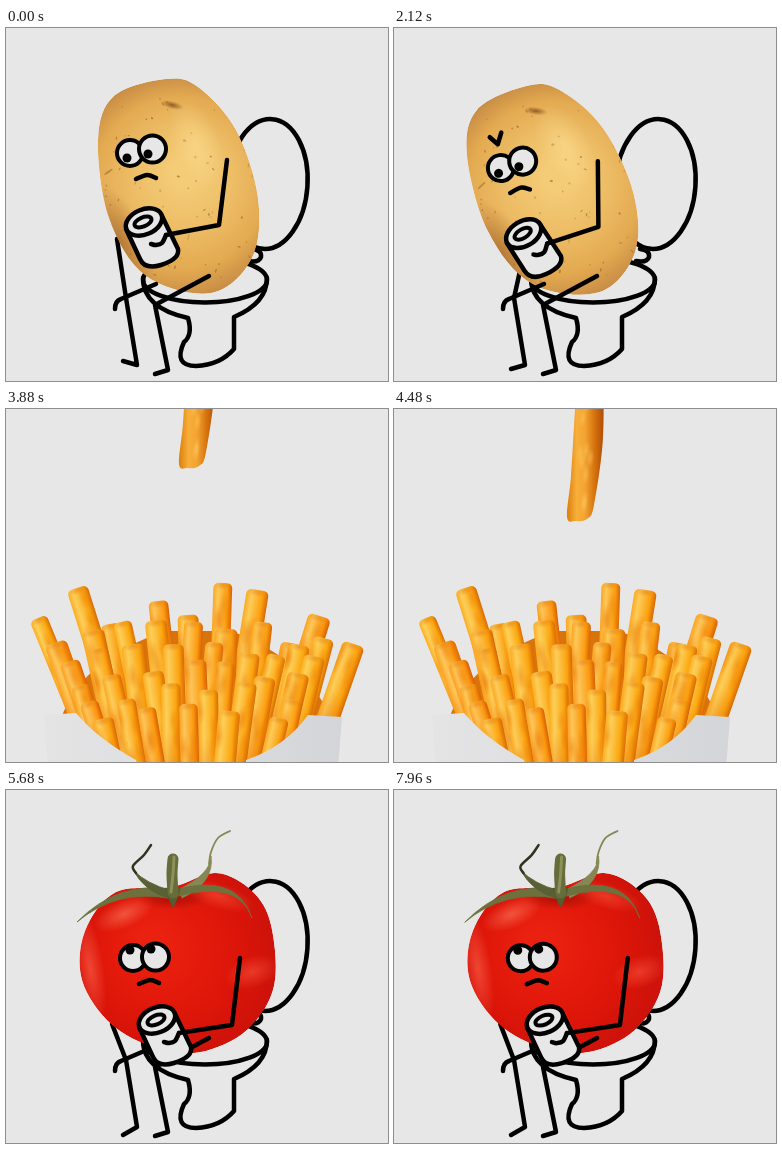
Write an HTML page with a canvas that moves like this. It is 382 px wide and 353 px high and loops after 8 s.

```html
<!DOCTYPE html>
<html lang="en">
<head>
<meta charset="utf-8">
<title>Waiting vegetables</title>
<style>
html, body { margin: 0; width: 100%; height: 100%; overflow: hidden; background: #e7e7e7; }
canvas { display: block; }
</style>
</head>
<body>
<canvas id="stage" width="382" height="353"></canvas>
<script>
const ctx = document.getElementById('stage').getContext('2d');
const TAU = Math.PI * 2, LOOP = 8000;
const FRIES_START = 2920, TOMATO_START = 5680;
const PAPER = '#e7e7e7';
const clamp = v => Math.max(0, Math.min(1, v));
const mix = (a, b, k) => a + (b - a) * k;
const smoother = u => u * u * u * (u * (u * 6 - 15) + 10);

function random(seed) {
  return () => (seed = (seed * 16807) % 2147483647) / 2147483647;
}

// Smooth path through flat x, y pairs.
function curve(p, closed) {
  const n = p.length / 2, path = new Path2D();
  const at = i => {
    const j = closed ? (i + n) % n : Math.max(0, Math.min(n - 1, i));
    return [p[j * 2], p[j * 2 + 1]];
  };
  path.moveTo(p[0], p[1]);
  for (let i = 0; i < (closed ? n : n - 1); i++) {
    const [a, b, c, d] = [at(i - 1), at(i), at(i + 1), at(i + 2)];
    path.bezierCurveTo(b[0] + (c[0] - a[0]) / 6, b[1] + (c[1] - a[1]) / 6,
      c[0] - (d[0] - b[0]) / 6, c[1] - (d[1] - b[1]) / 6, c[0], c[1]);
  }
  if (closed) path.closePath();
  return path;
}

function ink(path, width = 4.5, color = '#000') {
  ctx.lineWidth = width;
  ctx.strokeStyle = color;
  ctx.stroke(path);
}

function line(...p) {
  const path = new Path2D();
  for (let i = 0; i < p.length; i += 2) path.lineTo(p[i], p[i + 1]);
  ink(path);
}

function oval(x, y, rx, ry, angle = 0) {
  const path = new Path2D();
  path.ellipse(x, y, rx, ry, angle, 0, TAU);
  return path;
}

function paint(path, fill) {
  ctx.fillStyle = fill;
  ctx.fill(path);
}

function shade(g, ...colors) {
  colors.forEach((c, i) => g.addColorStop(i / (colors.length - 1), c));
  return g;
}

function glow(x, y, rx, ry, angle, rgb, alpha) {
  ctx.save();
  ctx.translate(x, y);
  ctx.rotate(angle);
  ctx.scale(rx, ry);
  paint(oval(0, 0, 1, 1),
    shade(ctx.createRadialGradient(0, 0, 0, 0, 0, 1), `rgba(${rgb},${alpha})`, `rgba(${rgb},0)`));
  ctx.restore();
}

const potatoShape = curve([160, 51, 108, 68, 92, 112, 103, 190, 140, 248, 205, 265,
  246, 230, 252, 170, 230, 102, 192, 59], true);
const tomatoShape = curve([166, 97, 110, 102, 79, 141, 76, 190, 105, 234, 150, 258,
  195, 262, 241, 240, 268, 196, 265, 135, 246, 101, 210, 83], true);

function potatoBody() {
  ctx.save();
  ctx.clip(potatoShape);
  paint(potatoShape, shade(ctx.createRadialGradient(180, 145, 15, 172, 160, 122),
    '#f4cb77', '#edbd66', '#e3aa51', '#bd8140'));
  glow(112, 215, 30, 62, -.4, '145,82,32', .6);
  glow(190, 115, 24, 46, -.4, '255,226,150', .5);
  glow(166, 77, 12, 4, .25, '120,65,20', .75);
  const rnd = random(29);
  for (let i = 0; i < 80; i++) {
    const size = i % 20 ? 1 : 2.5;
    paint(oval(95 + rnd() * 155, 55 + rnd() * 205, (.6 + rnd() * 1.5) * size, .5 + rnd() * .7, rnd() * 3),
      `rgba(140,82,32,${.2 + rnd() * .4})`);
  }
  ctx.restore();
}

// Tapering blade that bends towards (cx, cy).
function leaf(x, y, cx, cy, tipX, tipY, width, color) {
  const length = Math.hypot(cx - x, cy - y);
  const nx = (y - cy) / length * width / 2, ny = (cx - x) / length * width / 2;
  const path = new Path2D();
  path.moveTo(x + nx, y + ny);
  path.quadraticCurveTo(cx + nx, cy + ny, tipX, tipY);
  path.quadraticCurveTo(cx - nx, cy - ny, x - nx, y - ny);
  paint(path, color);
  ink(path, .8, color);
}

function tomatoBody() {
  ctx.save();
  ctx.clip(tomatoShape);
  paint(tomatoShape, shade(ctx.createRadialGradient(145, 155, 15, 165, 168, 115),
    '#ea2110', '#e31a0b', '#d91409', '#c8120b'));
  glow(84, 178, 14, 58, -.15, '255,110,85', .55);
  glow(118, 124, 32, 14, -.4, '255,140,110', .5);
  glow(212, 106, 38, 13, .3, '255,100,70', .45);
  glow(246, 182, 28, 16, -.3, '255,95,70', .5);
  glow(166, 108, 36, 12, 0, '110,8,0', .5);
  ctx.restore();
  leaf(165, 104, 112, 94, 71, 132, 9, '#6c713e');
  leaf(163, 104, 140, 98, 127, 80, 8, '#596035');
  ink(curve([130, 83, 127, 76, 138, 65, 145, 55]), 2.5, '#30331f');
  leaf(174, 104, 207, 88, 205, 66, 9, '#858854');
  ink(curve([203, 74, 205, 62, 212, 48, 224, 41]), 1.8, '#858854');
  leaf(170, 103, 232, 86, 246, 128, 7, '#6c713e');
  leaf(167, 98, 167, 104, 167, 117, 14, '#555c31');
  ink(curve([167, 69, 166, 84, 167, 103]), 11, '#666c3a');
  ink(curve([168, 67, 167, 84, 165, 102]), 3, '#8c9159');
}

function eye(x, y, r, px, py) {
  paint(oval(x, y, r, r), PAPER);
  ink(oval(x, y, r, r), 4);
  paint(oval(px, py, 4.5, 4.5), '#000');
}

// Eyes, mouth and a frown that appears while straining.
function face(x, y, rise, look, strained) {
  eye(x, y, 13, x - 3, y + look);
  eye(x + 22.5, y - rise, 13.5, x + 18, y - rise + look);
  const mx = x + 14, my = y + 22;
  ink(curve([mx - 8, my + 4, mx + 3, my, mx + 12, my + 3]));
  if (strained) line(x - 7, y - 32, x, y - 24, x + 5, y - 35);
}

function paperRoll() {
  const side = new Path2D('M120 201L134 231Q139 242 155 237Q174 231 172 221L156 188Z');
  const top = oval(138, 194, 19, 12.5, -.4);
  for (const part of [side, top]) {
    paint(part, PAPER);
    ink(part);
  }
  ink(oval(137, 194, 9, 4.5, -.4), 4);
  ink(curve([160, 207, 156, 215, 150, 217, 145, 216]));
}

const potato = {
  body: potatoBody, face: [124, 125, 4, 5], roll: [0, 0], toe: 341, shoulder: [111, 211],
  arm: [221, 132, 213, 197, 160, 207]
};
const tomato = {
  body: tomatoBody, face: [127, 168, 1, -8], roll: [13, 36], toe: 345, shoulder: [106, 234],
  arm: [234, 168, 226, 235, 173, 243]
};

function toilet() {
  ink(oval(261.5, 156, 40, 65, .07));
  ink(new Path2D('M246 221Q256 222 255 229Q253 235 242 233'));
  ink(oval(199, 252, 62, 22.5));
  ink(new Path2D('M137 250Q137 280 182 290Q187 307 178 314Q167 338 190 338' +
    'Q214 337 228 321V289Q261 275 261 250'));
}

function leaning(tilt, shift, drawing) {
  ctx.save();
  ctx.translate(200, 265);
  ctx.rotate(-.133 * tilt);
  ctx.translate(-200, -265 + shift * tilt);
  drawing();
  ctx.restore();
}

// Foot taps, a pause, then the whole body strains to the left.
function sitter(who, time) {
  const step = Math.floor(time / 80);
  const lift = time < 1680 ? (step % 3) / 2 : 0;
  const tilt = smoother(clamp((step * 80 - 2200) / 320));
  toilet();
  line(mix(who.shoulder[0], 127, tilt), mix(who.shoulder[1], 240, tilt), 120, 270);
  leaning(tilt, 0, who.body);
  leaning(tilt, 4, () => face(...who.face, tilt > .4));

  line(203, 248, 149, 277, 162, 342, 149, 346);
  ink(new Path2D('M150 256L115 271Q109 273 109 281'));
  line(120, 270, 131, 337, 117, mix(who.toe, 333, lift));

  leaning(tilt, 3, () => {
    ctx.save();
    ctx.translate(...who.roll);
    paperRoll();
    ctx.restore();
    line(...who.arm);
  });
}

// Every fry leans towards the middle of the carton.
function fry(x, y, rnd) {
  const width = 18 + rnd() * 5, half = width / 2, hue = 34 + rnd() * 5;
  const tone = (lightness, turn = 0) => `hsl(${hue + turn},97%,${lightness}%)`;
  ctx.save();
  ctx.translate(x, y);
  ctx.rotate((x - 190) * .0023 + (rnd() - .5) * .12);
  const shape = new Path2D();
  shape.roundRect(-half, 0, width, 118, 5);
  paint(shape, shade(ctx.createLinearGradient(-half, 0, half, 0),
    tone(56), tone(67, 5), tone(60, 2), tone(52), tone(43, -9)));
  ctx.clip(shape);
  for (let i = 0; i < 4; i++) {
    glow((rnd() - .5) * width, 8 + rnd() * 60, 6, 14, 0, '235,125,10', .45);
  }
  glow(0, 2, half, 5, 0, '225,125,20', .5);
  glow(0, 118, width, 70, 0, '215,85,0', .55);
  ctx.restore();
}

const peaks = [[32, 209], [71, 179], [104, 215], [152, 192], [182, 206],
  [217, 174], [252, 181], [285, 234], [314, 207], [348, 235]];

const dropShape = curve([-11, -4, -7, -45, -3, -112, -1, -146, 22, -146,
  25, -84, 16, -16, 9, -2, -2, 0], true);

// Slides in slowly, hangs for a moment, falls and settles.
function droppedFry(time) {
  if (time < 3560) return;
  const eased = 112 * (1 - Math.pow(1 - clamp((time - 3520) / 960), 1.59));
  const fall = clamp((time - 4480) / 320);
  const settle = clamp((time - 4800) / 280);
  const wobble = Math.sin(settle * TAU * 1.5) * (1 - settle);
  ctx.save();
  ctx.translate(184, eased + 178 * fall * fall - 8 * Math.abs(wobble));
  ctx.rotate(.06 * wobble);
  paint(dropShape, shade(ctx.createLinearGradient(-10, 0, 24, 0),
    '#de8412', '#f8ae3a', '#f3a332', '#d9780f', '#b85207'));
  const rnd = random(11);
  for (let i = 0; i < 9; i++) {
    glow(2 + rnd() * 12, -10 - rnd() * 130, 4, 10, .1, '255,205,100', .45);
  }
  ctx.restore();
}

const heap = new Path2D('M55 310Q75 250 160 222H225Q300 250 325 310L240 375H130Z');
const carton = new Path2D('M38 306L70 304Q92 330 130 351L132 360H240V351Q279 338 302 306L336 308L332 360H42Z');

function friesScene(time) {
  const rnd = random(7);
  paint(heap, '#d9730c');
  for (const [x, y] of peaks) fry(x, y, rnd);
  for (let row = 0; row < 5; row++) {
    if (row === 2) droppedFry(Math.floor(time / 40) * 40);
    const count = 9 - row, reach = 138 - row * 13;
    for (let i = 0; i < count; i++) {
      const x = 185 + reach * (2 * i / (count - 1) - 1) + (rnd() - .5) * 12;
      fry(x, 214 + row * 21 + (x - 185) ** 2 * .0013 + (rnd() - .5) * 16, rnd);
    }
  }
  paint(carton, shade(ctx.createLinearGradient(38, 0, 336, 0), '#e4e4e5', '#dcdddf', '#d4d5d8'));
}

function draw(time) {
  ctx.fillStyle = '#e7e7e7';
  ctx.fillRect(0, 0, 382, 353);
  ctx.lineCap = ctx.lineJoin = 'round';
  if (time < FRIES_START) sitter(potato, time + 400);
  else if (time < TOMATO_START) friesScene(time);
  else sitter(tomato, time - TOMATO_START);
}

const start = performance.now();
function tick() {
  draw((performance.now() - start) % LOOP);
  requestAnimationFrame(tick);
}
tick();
</script>
</body>
</html>
```
